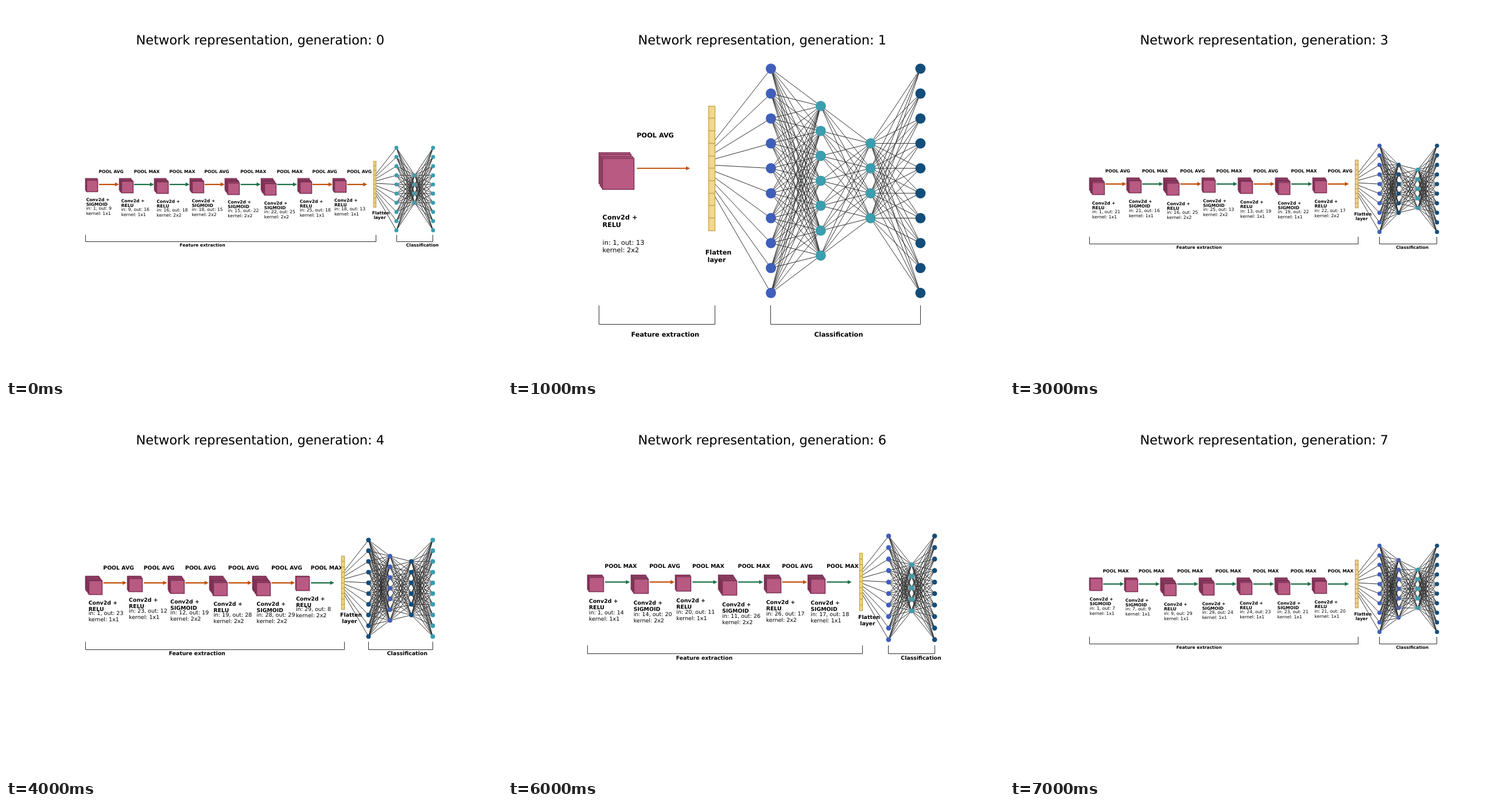
Write an HTML page that moves like this. It is 864 px wide and 648 px high and loops after 8000 ms.

```html
<!DOCTYPE html>
<html lang="en">
<head>
<meta charset="utf-8">
<title>Network representation</title>
<style>
  html, body { margin: 0; width: 100%; height: 100%; overflow: hidden; background: #fff; }
  svg { display: block; width: 864px; height: 648px; }
  text { font-family: "DejaVu Sans", sans-serif; fill: #000; text-rendering: geometricPrecision; }
  .bold { font-weight: bold; }
  .wire { stroke: #2e2e2e; stroke-width: 1; fill: none; }
  .conv { fill: #b85a82; stroke: #7d3355; stroke-width: 1.5; }
  .cell { fill: #f3d887; stroke: #c9a650; stroke-width: 1.4; }
</style>
</head>
<body>
<svg id="stage" viewBox="0 0 864 648"></svg>
<script>
// Convolutions: output channels, activation (S/R), kernel size, pooling (A/M).
// Layers: colour key and node count.
const GENERATIONS = [
  ['9S1A 16R1M 18R2M 15S2A 22S2M 25S2M 18R1A 13R1A', 'T10 T4 T10'],
  ['13R2A', 'B10 T7 T4 N10'],
  ['27S2M 16R1M 24S2M 17S2A 14S1M 19S2A', 'T10 N5 N10'],
  ['21R1A 16S1M 25R2A 13S2M 19R1A 22S1M 17R2A', 'B10 N6 T5 N10'],
  ['23R1A 12R1A 19S2A 28R2A 29S2A 8R2M', 'N10 B7 N6 T10'],
  ['27R2M 29R1M', 'T10 B3 B10'],
  ['14R1M 20S2A 11R1M 26S2M 17R2A 18S1M', 'B10 T5 N10'],
  ['7S1M 9S1M 29R1M 24S1M 23R1M 21S1M 20R1M', 'B10 B7 T5 N10']
];
const STEP = 1000;
const NODE_COLORS = { T: '#3c9dae', B: '#3f5fbb', N: '#134e7b' };
const POOL_COLORS = { A: '#c0500a', M: '#1e7049' };
const ACTIVATIONS = { S: 'SIGMOID', R: 'RELU' };
const AREA = { cx: 442.8, cy: 327.24, w: 608.73, h: 453.6 };

// Layout measures in units of the node spacing.
const SIDE = 1.25, SHIFT_X = .05, SHIFT_Y = .075;
const GAP = 2.375, FLAT_GAP = 3, DENSE_GAP = 2.5, LAYER_GAP = 2, RADIUS = .2;
const HEIGHT = 10.45, MIDDLE = 5.025;

const stage = document.getElementById('stage');
const snap = v => Math.floor(v) + .5;

function add(parent, tag, attrs, content) {
  const el = document.createElementNS('http://www.w3.org/2000/svg', tag);
  for (const key in attrs) el.setAttribute(key, attrs[key]);
  if (content !== undefined) el.textContent = content;
  parent.appendChild(el);
  return el;
}

function box(g, cls, x, y, w, h) {
  const left = snap(x), top = snap(y);
  add(g, 'rect', { class: cls, x: left, y: top, width: snap(x + w) - left, height: snap(y + h) - top });
}

function parseConvs(text) {
  let input = 1;
  return text.split(' ').map(token => {
    const [, out, act, kernel, pool] = token.match(/(\d+)(\w)(\d)(\w)/);
    const conv = { input, out: +out, act, kernel, pool, extra: Math.floor(out / 3) - 1 };
    input = conv.out;
    return conv;
  });
}

function drawGeneration([convText, layerText], index) {
  const g = add(stage, 'g', { display: 'none' });
  const convs = parseConvs(convText);
  const layers = layerText.split(' ').map(t => ({ color: NODE_COLORS[t[0]], count: +t.slice(1) }));

  const width = convs.reduce((sum, c) => sum + SIDE + SHIFT_X * c.extra, 0)
    + (convs.length - 1) * GAP + FLAT_GAP + DENSE_GAP + (layers.length - 1) * LAYER_GAP + RADIUS;
  const s = Math.min(AREA.w / width, AREA.h / HEIGHT);
  const left = AREA.cx - width * s / 2;
  const X = u => left + u * s;
  const Y = u => AREA.cy + (u - MIDDLE) * s;
  const [boldSize, plainSize] = s > 30 ? [11.3, 11.4] : s > 17.5 ? [9.4, 9.5] : [7.55, 7.7];

  // The last line sits on the given height, earlier lines stack above it.
  function label(lines, ux, uy, bold = true) {
    const size = bold ? boldSize : plainSize;
    const base = Math.round(Y(uy) + .4);
    lines.forEach((line, i) => add(g, 'text', {
      class: bold ? 'bold' : 'plain', 'font-size': size,
      x: X(ux) - .4, y: base - (lines.length - 1 - i) * size * 1.12
    }, line));
  }

  function arrow(u, color) {
    const start = X(u), y = Y(4), tip = start + 2.1 * s + 1.3;
    add(g, 'path', { d: `M${start} ${y}H${tip - 5}`, stroke: color, 'stroke-width': 2.2 });
    add(g, 'path', { d: `M${tip} ${y}l-7 -3.5v7z`, fill: color });
  }

  function bracket(from, to, name) {
    const x1 = snap(X(from)), x2 = snap(X(to));
    add(g, 'path', { class: 'wire', d: `M${x1} ${Y(9.5)}V${snap(Y(10.25))}H${x2}V${Y(9.5)}` });
    label([name], from + (to - from) / 3 - .25, 10.75);
  }

  let u = 0;
  convs.forEach((c, n) => {
    for (let i = 0; i <= c.extra; i++)
      box(g, 'conv', X(u + SHIFT_X * i), Y(3.375 + SHIFT_Y * i), SIDE * s, SIDE * s);
    const front = u + SHIFT_X * c.extra;
    const bottom = 3.375 + SIDE + SHIFT_Y * c.extra;
    const end = front + SIDE;
    arrow(end + .125, POOL_COLORS[c.pool]);
    label(['POOL ' + (c.pool === 'A' ? 'AVG' : 'MAX')], end + .125, 2.75);
    label(['Conv2d +', ACTIVATIONS[c.act]], front, bottom + 1.5);
    label([`in: ${c.input}, out: ${c.out}`, `kernel: ${c.kernel}x${c.kernel}`], front, bottom + 2.5, false);
    u = end + (n < convs.length - 1 ? GAP : FLAT_GAP);
  });

  const flat = u, dense = u + DENSE_GAP;
  const nodes = layers.map((layer, n) => Array.from({ length: layer.count }, (_, i) =>
    [X(dense + n * LAYER_GAP), Y((10 - layer.count) / 2 + i)]));
  const sources = nodes[0].map((_, i) => [X(flat + .25), Y(4 + (i - 4.5) * .25)]);

  let wires = '';
  nodes[0].forEach((p, i) => { wires += `M${sources[i]}L${p}`; });
  for (let n = 1; n < nodes.length; n++)
    for (const a of nodes[n - 1]) for (const b of nodes[n]) wires += `M${a}L${b}`;
  add(g, 'path', { class: 'wire', d: wires });

  for (let i = 0; i < 10; i++) box(g, 'cell', X(flat), Y(1.5 + i / 2), s / 4, s / 2);
  nodes.forEach((column, n) => column.forEach(([cx, cy]) =>
    add(g, 'circle', { cx, cy, r: RADIUS * s + .3, fill: layers[n].color })));

  label(['Flatten', '\u00a0layer'], flat - .125, 7.75);
  bracket(0, flat + .25, 'Feature extraction');
  bracket(dense, dense + (layers.length - 1) * LAYER_GAP, 'Classification');
  add(g, 'text', { x: AREA.cx, y: 67, 'font-size': 22.55, 'text-anchor': 'middle' },
    `Network representation, generation: ${index}`);
  return g;
}

const scenes = GENERATIONS.map(drawGeneration);
const began = performance.now();
let shown = -1;

function tick() {
  const current = Math.floor((performance.now() - began) / STEP) % scenes.length;
  if (current !== shown) {
    scenes.forEach((g, i) => g.setAttribute('display', i === current ? 'inline' : 'none'));
    shown = current;
  }
  requestAnimationFrame(tick);
}
tick();
</script>
</body>
</html>
```
